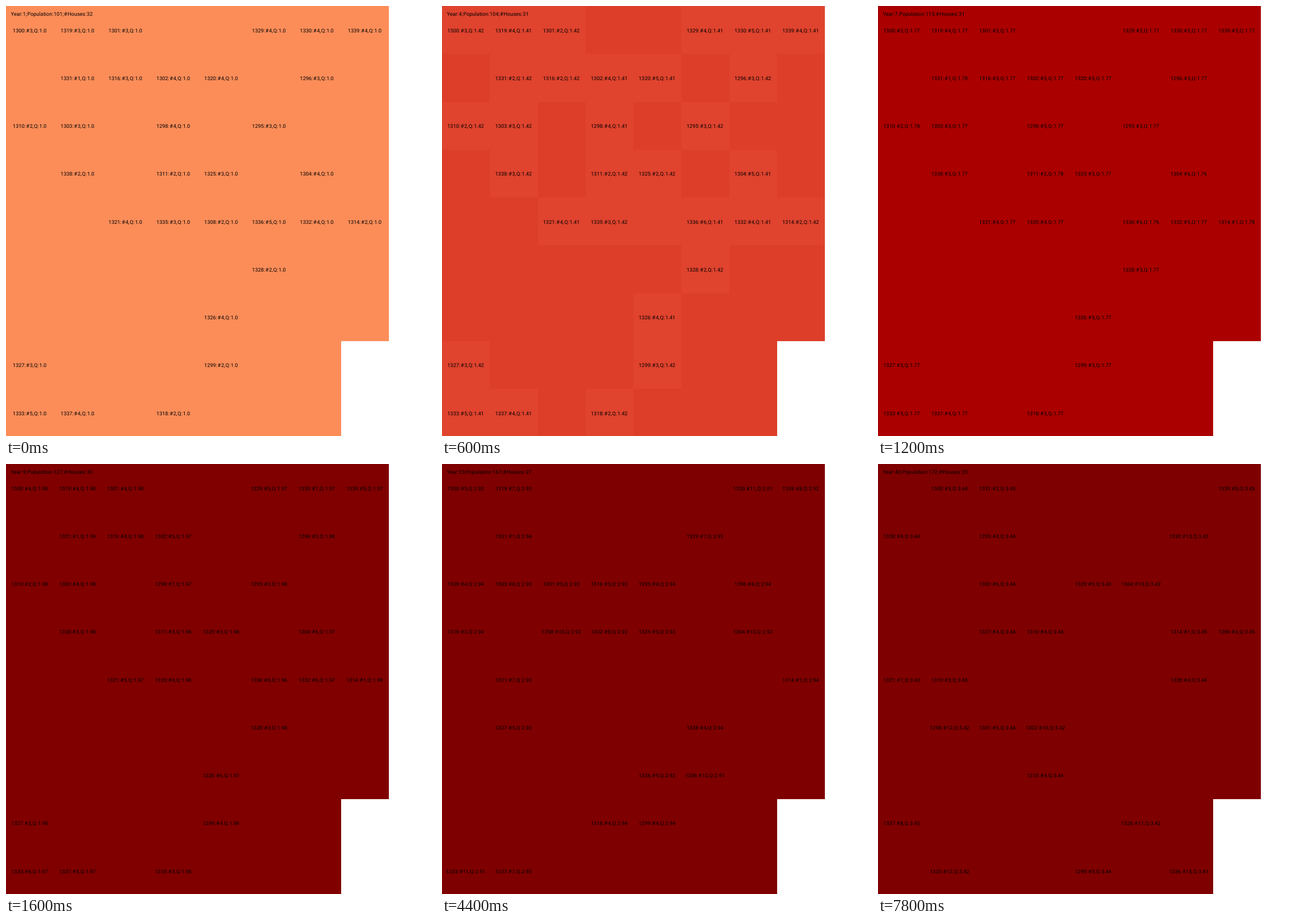
Write an HTML page that moves like this. It is 748x748 px and loops after 8 s.

```html
<!DOCTYPE html>
<html lang="en">
<head>
<meta charset="utf-8">
<title>Houses</title>
<style>
html, body { margin: 0; width: 100%; height: 100%; overflow: hidden; background: #fff; }
svg { display: block; width: 100vw; height: 100vh; }
text { font: 9px Roboto, Arial, sans-serif; word-spacing: -1.5px; fill: #000; white-space: pre; text-rendering: geometricPrecision; }
rect { shape-rendering: crispEdges; }
</style>
</head>
<body>
<svg id="stage" viewBox="0 0 748 748"></svg>
<script>
const CELL = 83.25, COLS = 8, ROWS = 9, STEP = 200, YEARS = 40;
const SETTLED = 7; // nobody moves before this year

// House numbers on the grid in the first and the last year
const opening = parse(`
1300 1319 1301 - - 1329 1330 1339
- 1331 1316 1302 1320 - 1296
1310 1303 - 1298 - 1295
- 1338 - 1311 1325 - 1304
- - 1321 1335 1308 1336 1332 1314
- - - - - 1328
- - - - 1326
1327 - - - 1299
1333 1337 - 1318`);
const closing = parse(`
- 1300 1331 - - - - 1339
1338 - 1295 - - - 1330
- - 1303 - 1329 1304
- - 1327 1316 - - 1314 1296
1321 1310 - - - - 1328
- 1298 1301 1302
- - - 1318
1337 - - - - 1326
- 1333 - - 1299 - 1336`);
const leaves = { 1308: 3, 1320: 9, 1332: 11, 1311: 13, 1335: 19, 1319: 27, 1325: 35 };
const population = [[1, 101], [4, 104], [7, 115], [15, 161], [23, 167], [30, 164], [40, 172]];

function parse(map) {
  const homes = new Map();
  map.trim().split("\n").forEach((line, row) => line.split(" ").forEach((id, col) => {
    if (id !== "-") homes.set(+id, { row, col });
  }));
  return homes;
}

const clamp = v => Math.min(1, Math.max(0, v));
const mix = (a, b, k) => a + (b - a) * k;
const random = seed => { const v = Math.sin(seed * 12.9898) * 43758.5453; return v - Math.floor(v); };
const inTown = (row, col) => row < 7 || col < COLS - 1;

// Quality climbs ever more slowly
const levelAt = year => 1 + 2.78 * (1 - Math.exp(-0.0545 * (year - 1)));

function peopleAt(year) {
  const i = Math.max(1, population.findIndex(p => p[0] >= year));
  const [y0, p0] = population[i - 1], [y1, p1] = population[i];
  return Math.round(mix(p0, p1, (year - y0) / (y1 - y0)));
}

// Upper half of the OrRd colour map
const ramp = [[252, 141, 89], [239, 101, 72], [215, 48, 31], [179, 0, 0], [127, 0, 0]];
function colour(quality) {
  const p = clamp(quality - 1) * 4, i = Math.min(3, Math.floor(p));
  return `rgb(${ramp[i].map((v, n) => Math.round(mix(v, ramp[i + 1][n], p - i)))})`;
}

// Nearest free cell to the wanted one
function settle(row, col, taken) {
  let best, least = Infinity;
  for (let r = 0; r < ROWS; r++) for (let c = 0; c < COLS; c++) {
    const d = (r - row) ** 2 + (c - col) ** 2;
    if (d < least && inTown(r, c) && !taken.has(r * COLS + c)) { least = d; best = { row: r, col: c }; }
  }
  taken.add(best.row * COLS + best.col);
  return best;
}

function housesAt(year) {
  const k = clamp((year - SETTLED) / (YEARS - SETTLED)), taken = new Set(), houses = [];
  for (const [id, from] of opening) {
    if (year >= leaves[id]) continue;
    const to = closing.get(id) || from;
    houses.push({ id, ...settle(mix(from.row, to.row, k), mix(from.col, to.col, k), taken) });
  }

  // One person each, the rest shared by weight so that the total is exact
  const weights = houses.map(h => (0.1 + random(h.id)) ** (1 + k / 2));
  const total = weights.reduce((a, b) => a + b);
  const spare = peopleAt(year) - houses.length;
  let sum = 0, given = 0;
  houses.forEach((h, i) => {
    sum += weights[i];
    const upTo = Math.round(spare * sum / total);
    h.people = 1 + upTo - given;
    given = upTo;
    h.quality = levelAt(year) + (2 - h.people) * 0.003 * clamp((year - 1) / 3);
  });
  return houses;
}

const rect = (x, y, w, h, fill) => `<rect x="${x}" y="${y}" width="${w}" height="${h}" fill="${fill}"/>`;
const label = (x, y, text, anchor) => `<text x="${x}" y="${y}" text-anchor="${anchor}">${text}</text>`;
const decimal = v => v.toFixed(2).replace(/0$/, "");

function draw(year) {
  const houses = housesAt(year);
  const quality = levelAt(year) + 0.015 * clamp((year - 1) / 3);
  const wear = 0.024 * clamp(1 - Math.abs(year - 4) / 3);
  const empty = colour(quality), lived = colour(quality - wear);
  let out = rect(0, 0, CELL * COLS, CELL * 7, empty) + rect(0, CELL * 7, CELL * 7, CELL * 2, empty);
  if (wear) for (const { row, col } of opening.values()) out += rect(col * CELL, row * CELL, CELL, CELL, lived);
  for (const h of houses) {
    out += label((h.col + 0.5) * CELL - 0.5, (h.row + 0.5) * CELL + 4,
      `${h.id}: # ${h.people}, Q: ${decimal(h.quality)}`, "middle");
  }
  out += label(8.6, 16.6, `Year: ${year}; Population: ${peopleAt(year)}; # Houses: ${houses.length}`, "start");
  stage.innerHTML = out;
}

const stage = document.getElementById("stage");
const start = performance.now();
let shown = 0;
function tick() {
  const year = Math.floor((performance.now() - start) / STEP) % YEARS + 1;
  if (year !== shown) draw(shown = year);
  requestAnimationFrame(tick);
}
tick();
</script>
</body>
</html>
```
